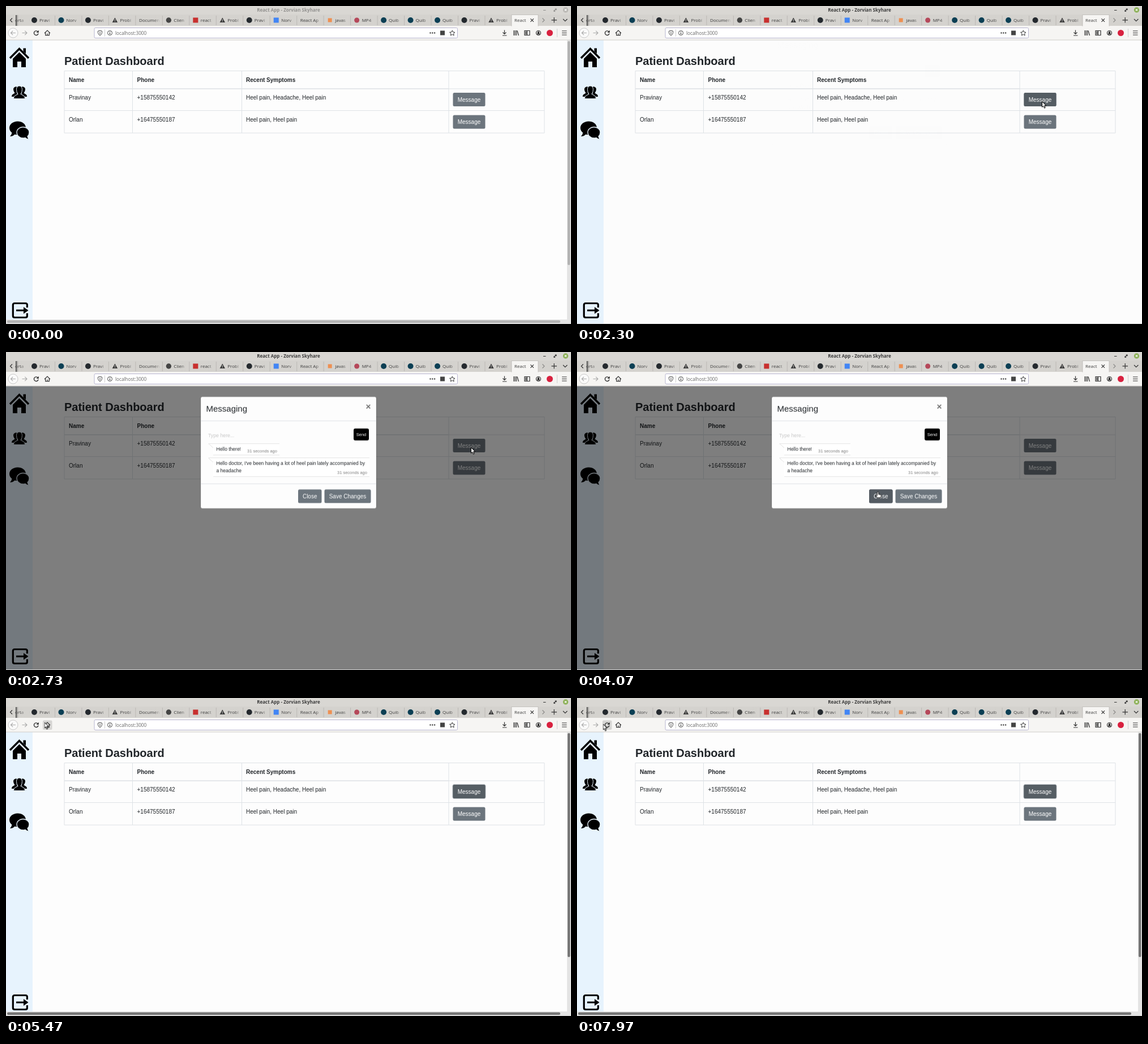
An HTML page for the animation above (8000 ms loop, 998x561 px).

```html
<!DOCTYPE html>
<html lang="en">
<head>
<meta charset="utf-8">
<title>Patient Dashboard</title>
<style>
html, body { margin: 0; width: 100%; height: 100%; overflow: hidden; background: #fdfdfd; }
svg { display: block; width: 998px; height: 561px; }
text { font: 10px "Liberation Sans", Arial, sans-serif; fill: #212529; }
.b { font-weight: bold; }
.ui, .ui text { font-family: "Open Sans", "Noto Sans", sans-serif; font-size: 8px; fill: #3c3c3c; }
.w { fill: #fff; }
.mid { text-anchor: middle; }
.msg { font-size: 8.5px; }
.ago { font-size: 7.5px; fill: #808080; }
.line { fill: none; stroke: #333; stroke-width: 1.2; }
.bubble { filter: drop-shadow(.7px .8px .6px #777); }

/* 1% of the loop is 80 ms */
.wake, .sun, .bars, .hot, .ring, .shut, .home, .load, .arrow, .hand { animation: 8s step-end infinite; }
.wake { animation-name: wake; }
.sun { animation-name: sun; }
.bars { animation-name: bars; }
.hot { animation-name: hot; }
.ring { animation-name: ring; }
.shut { animation-name: shut; }
.home { animation-name: home; }
.load { animation-name: load; }
.arrow { animation-name: arrow; }
.hand { animation-name: hand; }
.fade { animation: fade 8s linear infinite; }
.slide { animation: slide 8s linear infinite; }
.cursor { animation: move 8s ease-in-out infinite; }

@keyframes wake { 0% { opacity: .45 } 27.5%, 100% { opacity: 1 } }
@keyframes sun { 0% { fill: #bab8b4 } 27.5%, 100% { fill: #8db158 } }
@keyframes bars { 0% { opacity: 1 } 28.75% { opacity: 0 } 60.06%, 100% { opacity: 1 } }
@keyframes hot { 0% { opacity: 0 } 25.6% { opacity: 1 } 31% { opacity: 0 } 60.06%, 100% { opacity: 1 } }
@keyframes ring { 0% { opacity: 0 } 60.06%, 100% { opacity: 1 } }
@keyframes shut { 0% { opacity: 0 } 44.75%, 100% { opacity: 1 } }
@keyframes home { 0% { opacity: 0 } 67% { opacity: 1 } 94.2%, 100% { opacity: 0 } }
@keyframes load { 0% { opacity: 0 } 94.6%, 100% { opacity: 1 } }
@keyframes arrow { 0% { opacity: 1 } 25.6% { opacity: 0 } 28.75% { opacity: 1 } 44.75% { opacity: 0 } 56.9%, 100% { opacity: 1 } }
@keyframes hand { 0% { opacity: 0 } 25.6% { opacity: 1 } 28.75% { opacity: 0 } 44.75% { opacity: 1 } 56.9%, 100% { opacity: 0 } }
@keyframes fade { 0%, 28.75% { opacity: 0 } 30.625%, 56.31% { opacity: 1 } 58.19%, 100% { opacity: 0 } }
@keyframes slide {
  0% { transform: translateY(-31.25px) }
  28.75% { transform: translateY(-31.25px); animation-timing-function: ease-out }
  32.5% { transform: none }
  56.31% { transform: none; animation-timing-function: ease-out }
  60.06%, 100% { transform: translateY(-31.25px) }
}
@keyframes move {
  0%, 15% { transform: translate(1010px, 100px) }
  19.5%, 21% { transform: translate(745px, 153px) }
  26.5%, 36% { transform: translate(821px, 168px) }
  46.5%, 56.31% { transform: translate(531.5px, 246.5px) }
  57.85%, 60% { transform: translate(569.5px, 259.5px) }
  67.6%, 92.5% { transform: translate(67.5px, 42.5px) }
  96%, 100% { transform: translate(45.5px, 45.5px) }
}
</style>
</head>
<body>
<svg viewBox="0 0 998 561" xmlns="http://www.w3.org/2000/svg">
  <defs>
    <linearGradient id="soft"><stop stop-color="#d4d2ce" stop-opacity="0"/><stop offset="1" stop-color="#d4d2ce"/></linearGradient>
    <linearGradient id="dark"><stop stop-color="#333"/><stop offset="1" stop-color="#d4d2ce" stop-opacity="0"/></linearGradient>
  </defs>

  <!-- page -->
  <path fill="#fdfdfd" d="M0 60H998V561H0Z"/>
  <path fill="#e7f3fd" d="M0 60H47V561H0Z"/>
  <g id="side">
    <path fill="none" stroke="#000" stroke-width="3.4" d="M7 92 23.5 75.500 40 92"/>
    <path d="M30.500 74.500H35V84L30.500 80ZM12 93 23.500 81.500 35 93V108H27V98H20V108H12Z"/>
    <g id="people">
      <path d="M10 160q0-4 3.500-5l2-1.500q-2.500-3-2.500-6.500t3.500-4.500 4.500 4.500-2 6l3 7ZM37 160q0-4-3.500-5l-2-1.500q2.500-3 2.500-6.500t-3.500-4.500-4.500 4.500 2 6l-3 7Z"/>
      <path stroke="#e7f3fd" stroke-width="1" d="M13.500 163.500q0-5 3.500-6l4-2q-2.500-3.500-2.500-8 0-6.500 5-6.500t5 6.500q0 4.500-2.500 8l4 2q3.500 1 3.500 6Z"/>
    </g>
    <path d="M20.500 203.500c-8 0-14.500 5-14.500 11.500 0 4 2 6.500 4.500 8.500q-.5 3.500-3.500 6.500 5 0 8.500-3.500 2.500.5 5 .5c8 0 14.500-5 14.500-12s-6.500-11.500-14.500-11.500Z"/>
    <path stroke="#e7f3fd" stroke-width="1.300" d="M30 213.500c-6 0-11 4-11 9.500s5 10 11 10q2 0 4-.6 3 2.800 7 2.800-2.500-2.500-3-5.200 3-2.500 3-7c0-5.500-5-9.500-11-9.500Z"/>
    <path fill="none" stroke="#000" stroke-width="3.200" d="M37.400 532V527.500q0-3-3-3H15.300q-3 0-3 3V546.500q0 3 3 3H34.400q3 0 3-3V542M18 537H33"/>
    <path d="M31 531 39.500 537 31 543Z"/>
  </g>

  <text class="b" x="103" y="104" style="font-size:20px">Patient Dashboard</text>
  <path fill="none" stroke="#dee2e6" d="M103 114.500H951V224H103ZM223.500 114.500V224M416.500 114.500V224M782 114.500V224M103 184.500H951M782 146H951"/>
  <path stroke="#dee2e6" stroke-width="1.500" d="M103 146H782"/>
  <text class="b" x="111" y="133.500">Name</text>
  <text class="b" x="231.500" y="133.500">Phone</text>
  <text class="b" x="424" y="133.500">Recent Symptoms</text>
  <text x="111" y="164.500">Pravinay</text>
  <text x="231.500" y="164.500">+15875550142</text>
  <text x="424" y="164.500">Heel pain, Headache, Heel pain</text>
  <text x="111" y="203.500">Orlan</text>
  <text x="231.500" y="203.500">+16475550187</text>
  <text x="424" y="203.500">Heel pain, Heel pain</text>

  <rect class="ring" x="788.500" y="152" width="59" height="26" rx="3.500" fill="#b8bdc2"/>
  <g fill="#6c757d">
    <rect x="789.500" y="153" width="57" height="24" rx="2.500"/>
    <rect x="789.500" y="192.500" width="57" height="24" rx="2.500"/>
  </g>
  <rect class="hot" x="789.500" y="153" width="57" height="24" rx="2.500" fill="#565e64"/>
  <text class="w mid" x="818" y="168.500">Message</text>
  <text class="w mid" x="818" y="208">Message</text>

  <g class="bars">
    <path fill="#e4e4e4" d="M991 60H998V561H0V553H991Z"/>
    <g class="wake" fill="#757575">
      <rect x="992" y="62" width="4.500" height="395" rx="2"/>
      <rect x="2" y="554.500" width="977" height="4.500" rx="2"/>
    </g>
  </g>

  <!-- modal -->
  <g class="fade"><path fill-opacity=".5" d="M0 60H998V561H0Z"/></g>
  <path fill="#d0d0d0" d="M0 560H998V561H0Z"/>
  <g class="fade"><g class="slide">
    <rect x="344" y="79" width="310" height="197" rx="3" fill="#fdfdfd" stroke="#000" stroke-opacity=".2" stroke-width=".7"/>
    <path stroke="#dee2e6" d="M344 121.500H654M344 232.500H654"/>
    <text x="353.500" y="105" style="font-size:15px">Messaging</text>
    <path stroke="#6f6f6f" stroke-width="1.700" d="m636.700 93 6.600 6.600m0-6.600-6.600 6.600"/>
    <text x="357" y="150" style="font-size:8.75px;fill:#c8c8c8">Type here...</text>
    <rect x="614" y="135" width="27" height="21" rx="3"/>
    <text class="w mid" x="627.500" y="148" style="font-size:7.5px">Send</text>
    <g fill="#fff">
      <path class="bubble" d="M357.500 161.500H483V182H366V169Z"/>
      <path class="bubble" d="M357.500 187H642V220H366V194.500Z"/>
    </g>
    <text class="msg" x="371.500" y="174">Hello there!</text>
    <text class="ago" x="426" y="177">31 seconds ago</text>
    <text class="msg" x="371.500" y="199.500">Hello doctor, I've been having a lot of heel pain lately accompanied by</text>
    <text class="msg" x="371.500" y="212">a headache</text>
    <text class="ago" x="585" y="215">31 seconds ago</text>
    <rect x="516" y="242.500" width="41.500" height="24" rx="2.500" fill="#6c757d"/>
    <rect class="shut" x="516" y="242.500" width="41.500" height="24" rx="2.500" fill="#545b62"/>
    <rect x="562.500" y="242.500" width="82" height="24" rx="2.500" fill="#6c757d"/>
    <text class="w mid" x="536.700" y="258">Close</text>
    <text class="w mid" x="603.500" y="258">Save Changes</text>
  </g></g>

  <!-- browser frame -->
  <path fill="#d9d7d3" d="M0 0H998V16H0Z"/>
  <path fill="#d4d2ce" d="M0 15H998V36H0Z"/>
  <g class="wake">
    <text class="ui b mid" x="499" y="10.300">React App - Zorvian Skyhare</text>
    <path class="line" d="M949 7.500h4.500M968.500 8.500l3-3m-1.800-.5h2.300v2.300m-4 0v2.200h2.200"/>
  </g>
  <circle class="sun" cx="988.500" cy="7" r="4.700"/>
  <path stroke="#fff" stroke-width="1.100" d="m986.800 5.300 3.400 3.400m0-3.400-3.400 3.400"/>
  <g id="tabs" class="ui"></g>
  <path fill="#f6f5f3" d="M0 35H998V60H0Z"/>
  <path fill="#cfcdca" d="M0 59.500H998V60.500H0Z"/>
  <path fill="#f6f5f3" stroke="#b5b3af" stroke-width=".7" d="M893 36V15.500H940V36"/>
  <path fill="#f6f5f3" d="M893.500 35H939.500V37H893.500Z"/>
  <text class="ui" x="898" y="28">React</text>
  <path class="line" d="m926.500 22.300 5.500 5.500m0-5.500-5.500 5.500"/>
  <path class="line" d="M11 21.500 7.500 25 11 28.500M963.500 24.800H973M968.200 20V29.500M984 23l3.700 3.700 3.700-3.700"/>
  <path class="line" stroke-opacity=".45" d="m947.500 21.500 3.500 3.500-3.500 3.500"/>
  <path fill="url(#dark)" d="M17 16H23V35H17Z"/>

  <rect class="load" x="45" y="39.500" width="16.500" height="16.500" rx="2" fill="#d6d5d3"/>
  <rect class="home" x="65" y="39.500" width="16.500" height="16.500" rx="2" fill="#d6d5d3"/>
  <circle cx="12.500" cy="47.500" r="8.500" fill="#fafafa" stroke="#bbb" stroke-width=".8"/>
  <path class="line" style="stroke:#aaa" d="M17 47.500H8.500m3.700-3.700-3.700 3.700 3.700 3.700M28.500 47.500H37m-3.700-3.700 3.700 3.700-3.700 3.700"/>
  <path class="line" style="stroke-width:1.400" d="M56.200 45.300A3.800 3.800 0 1 0 57 48.300"/>
  <path fill="#333" d="M57.800 42.800V47H53.600Z"/>
  <path class="line" d="M68 48 73 43 78 48M69.700 47V51.700H76.300V47M73 51.700V48.500"/>
  <rect x="156" y="38.500" width="641.500" height="18" rx="2" fill="#fff" stroke="#b7b4cf"/>
  <path stroke="#d0d0d0" d="M174.500 41V54M973.500 40V55"/>
  <path class="line" style="stroke-width:.9" d="M162.500 44.200 166 43.200 169.500 44.200V47.500Q169 50.500 166 52 163 50.500 162.500 47.500ZM166 45V50"/>
  <circle class="line" style="stroke-width:.9" cx="183.500" cy="47.500" r="4"/>
  <path class="line" d="M183.500 47V50M183.500 45V46"/>
  <text class="ui" x="193" y="50.500" style="font-size:8.200px;fill:#666">localhost:3000</text>
  <g fill="#444"><circle cx="749.500" cy="47.500" r="1.200"/><circle cx="753.300" cy="47.500" r="1.200"/><circle cx="757.100" cy="47.500" r="1.200"/><rect x="767" y="43.500" width="8" height="8"/></g>
  <path class="line" style="stroke-width:1" d="m788.300 43 1.400 3 3.300.4-2.400 2.200.6 3.300-2.900-1.600-2.900 1.600.6-3.300-2.400-2.200 3.300-.4Z"/>
  <path class="line" d="M880.500 42.500V49.500m-3-3 3 3 3-3M877 52H884.500M897 43V52M899.300 43V52M901.600 43V52M903 43.500 905.500 52M982 44H990.500M982 47.500H990.500M982 51H990.500"/>
  <path class="line" d="M916 43.500H925V51.500H916ZM920.500 43.500V51.500"/>
  <path fill="#777" d="M917 44.500H920V50.500H917Z"/>
  <circle class="line" cx="940.500" cy="47.500" r="4"/>
  <path fill="#333" d="M937.800 50.300q0-2 1.500-2.300a1.900 1.900 0 1 1 2.400 0q1.500.3 1.500 2.300Z"/>
  <circle cx="960.500" cy="47.500" r="5.500" fill="#d8213f"/>

  <g class="cursor" stroke="#000" fill="#fff" stroke-linejoin="round">
    <path class="arrow" stroke-width="1" d="M.5.500V10.500L2.800 8.400 4.500 12.200 6.200 11.500 4.600 7.800H7.700Z"/>
    <path class="hand" stroke-width=".9" d="M-1.200 1.200a1.200 1.200 0 0 1 2.400 0V4.500l3.500.8q1.300.4 1.200 1.700L5 10.500H-.5L-4 7q-.3-1.300 1-1.200L-1.200 7Z"/>
  </g>
</svg>
<script>
const tabs = document.getElementById("tabs");
const dot = (fill, r = 5) => x => `<circle cx="${x}" cy="25" r="${r}" fill="${fill}"/>`;
const box = (fill, s = 9) => x => `<rect x="${x - s / 2}" y="${25 - s / 2}" width="${s}" height="${s}" fill="${fill}"/>`;
const warn = x => `<path fill="#3a3a3a" d="M${x} 20.500l4.700 8.500h-9.400Z"/>
  <path stroke="#ddd" d="M${x} 23.500v2.700m0 .8v1"/>`;
const repo = [dot("#24292e"), "Pravi"];
const plan = [dot("#0b3f54"), "Norv"];
const post = [dot("#0b3f54"), "Quib"];
const fail = [warn, "Probl"];
const list = [
  repo, plan, repo, fail, [null, "Documen"], [dot("#444", 4.7), "Clien"],
  [box("#c8302f"), "react"], fail, repo, [box("#4285f4"), "Norv"],
  [null, "React Ap"], [box("#ee9052", 7), "javas"], [dot("#b5485a", 4.5), "MP4"],
  post, post, post, repo, fail
];
const step = 47.47, first = 39;
const fadeEdge = x => `<rect x="${x + 33}" y="17" width="11" height="17" fill="url(#soft)"/>`;

tabs.innerHTML = `<text x="16" y="28">orta</text>${fadeEdge(first - step)}` +
  list.map(([icon, label], i) => {
    const x = first + i * step;
    return (icon ? icon(x + 11) : "") +
      `<text x="${x + (icon ? 20 : 6)}" y="28">${label}</text>` + fadeEdge(x) +
      `<path stroke="#b5b3af" stroke-width=".8" d="M${x + step} 17V34"/>`;
  }).join("");
</script>
</body>
</html>
```
